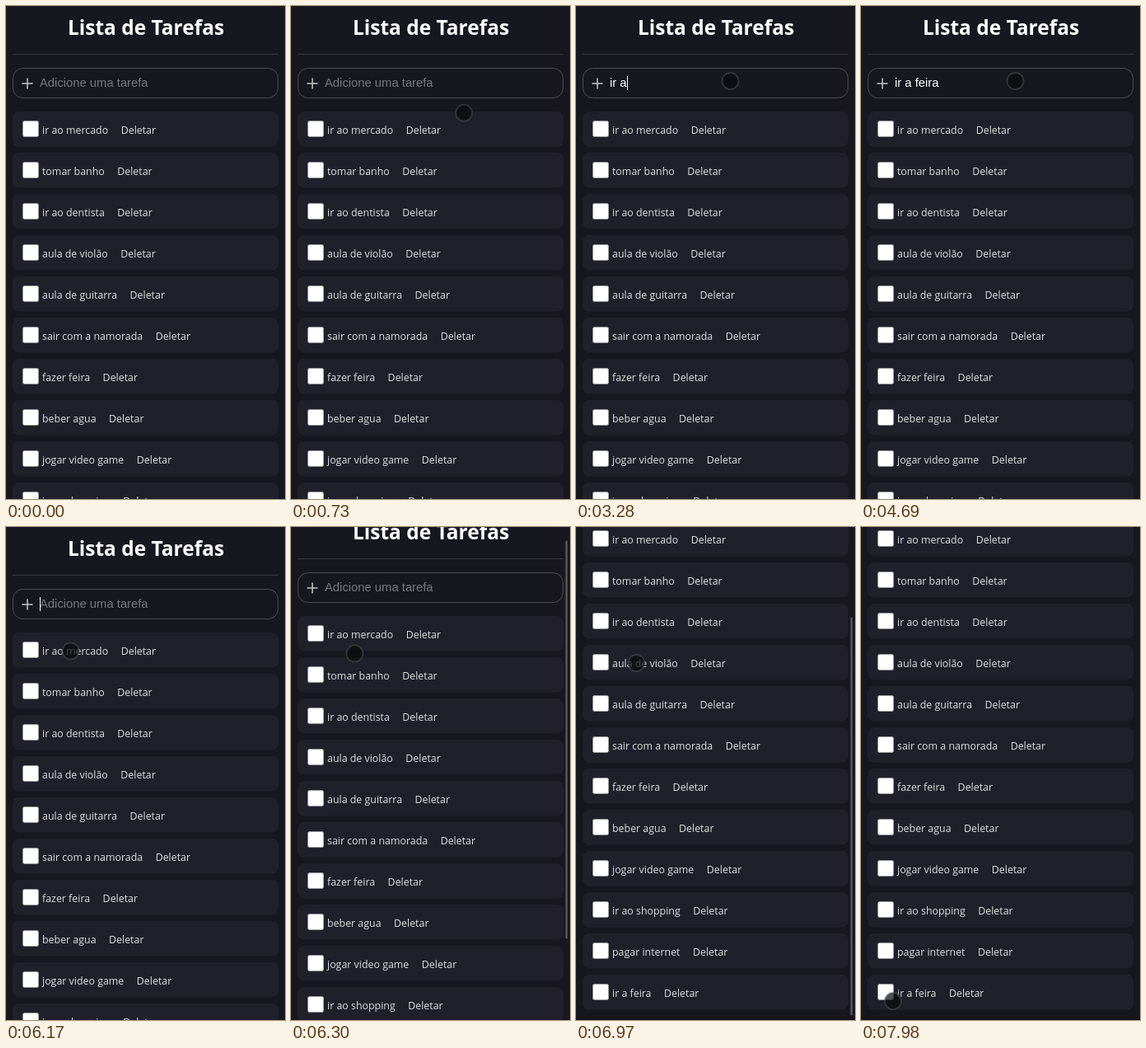
Animation of 339x598 px, one loop 8000 ms. Source, as an HTML page with a canvas:

```html
<!DOCTYPE html>
<html lang="pt">
<head>
<meta charset="utf-8">
<title>Lista de Tarefas</title>
<style>
  html, body { margin: 0; width: 100%; height: 100%; overflow: hidden; background: #17171f; }
  canvas { display: block; width: 339px; height: 598px; }
</style>
</head>
<body>
<canvas id="stage"></canvas>
<script>
const W = 339, H = 598, LOOP = 8000;
const canvas = document.getElementById('stage');
const ctx = canvas.getContext('2d');
const ratio = window.devicePixelRatio || 1;
canvas.width = W * ratio;
canvas.height = H * ratio;

const UI = '"Open Sans", "Noto Sans", sans-serif';
const TITLE_FONT = 'bold 24.5px ' + UI;
const TASK_FONT = '12.4px ' + UI;
const FIELD_FONT = '14.8px "Liberation Sans", Arial, sans-serif';

const tasks = [
  'ir ao mercado', 'tomar banho', 'ir ao dentista', 'aula de violão',
  'aula de guitarra', 'sair com a namorada', 'fazer feira', 'beber agua',
  'jogar video game', 'ir ao shopping', 'pagar internet'
];
const newTask = 'ir a feira';

const ENTER = 187, FOCUS = 1460, TYPE_START = 2730, TYPE_END = 4160, SUBMIT = 4820;
const BLINK = 480;
const ROW = 50, LIST_TOP = 128, ROW_HEIGHT = 42.5;
const PAGE_END = LIST_TOP + (tasks.length + 1) * ROW + 1;
const MAX_SCROLL = PAGE_END + 4 - H;
const WHEEL_STEP = 82;

const pointerStart = { x: 306, y: 545 };
const pointerMoves = [
  { from: ENTER, to: 800, x: 198, y: 77 },
  { from: 1080, to: 1260, x: 187.5, y: 91 },
  { from: 5700, to: 6170, x: 78.5, y: 150.5 },
  { from: 6250, to: 6500, x: 73.5, y: 165 },
  { from: 6980, to: 7450, x: 101, y: 403 },
  { from: 7450, to: 7720, x: 39, y: 575 }
];

const progress = (t, from, to) => Math.max(0, Math.min(1, (t - from) / (to - from)));
const smooth = p => p * p * (3 - 2 * p);
const mix = (a, b, p) => a + (b - a) * p;

function pointerAt(t) {
  return pointerMoves.reduce((pos, move) => {
    const p = progress(t, move.from, move.to);
    return { x: mix(pos.x, move.x, p), y: mix(pos.y, move.y, p) };
  }, pointerStart);
}

// Typing runs a little faster around the middle of the phrase
function keyTime(i) {
  const p = i / (newTask.length - 1);
  return mix(TYPE_START, TYPE_END, p) - 60 * Math.sin(Math.PI * p);
}

const scrollAt = t =>
  WHEEL_STEP * smooth(progress(t, 6240, 6430)) +
  (MAX_SCROLL - WHEEL_STEP) * smooth(progress(t, 6800, 6970));

function text(str, x, y, font, color, align = 'left') {
  ctx.font = font;
  ctx.fillStyle = color;
  ctx.textAlign = align;
  ctx.fillText(str, x, y);
  return ctx.measureText(str).width;
}

function roundBox(x, y, w, h, r, fill, stroke) {
  ctx.beginPath();
  ctx.roundRect(x, y, w, h, r);
  if (fill) { ctx.fillStyle = fill; ctx.fill(); }
  if (stroke) { ctx.strokeStyle = stroke; ctx.lineWidth = 1; ctx.stroke(); }
}

function drawPlus(x, y, arm) {
  ctx.strokeStyle = '#c6c6c8';
  ctx.lineWidth = 1.5;
  ctx.beginPath();
  ctx.moveTo(x - arm, y);
  ctx.lineTo(x + arm, y);
  ctx.moveTo(x, y - arm);
  ctx.lineTo(x, y + arm);
  ctx.stroke();
}

function drawField(t) {
  roundBox(8.5, 75.5, 322, 36, 12, null, '#4c4c53');
  drawPlus(26, 94, 6.5);

  const keys = [...newTask].map((_, i) => keyTime(i)).filter(k => k <= t);
  const value = t < SUBMIT ? newTask.slice(0, keys.length) : '';
  if (value) text(value, 41, 98, FIELD_FONT, '#fff');
  else text('Adicione uma tarefa', 41, 98, FIELD_FONT, '#77777c');

  // The caret restarts its blink at every input
  const lastInput = Math.max(...[FOCUS, ...keys, SUBMIT].filter(k => k <= t));
  if (t >= FOCUS && (t - lastInput) % (2 * BLINK) < BLINK) {
    ctx.font = FIELD_FONT;
    ctx.fillStyle = '#fff';
    ctx.fillRect(41 + Math.round(ctx.measureText(value).width), 85, 1, 17);
  }
}

function drawTask(label, i) {
  const y = LIST_TOP + i * ROW;
  roundBox(8, y, 323, ROW_HEIGHT, 8, '#20202b');
  roundBox(20.5, y + 11.5, 19, 19, 2, '#fff', '#9a9a9c');
  const width = text(label, 44, y + 27, TASK_FONT, '#dedee0');
  text('Deletar', 44 + width + 15.5, y + 27, TASK_FONT, '#dedee0');
}

function drawScrollbar(scroll, alpha) {
  const scale = (H - 6) / (H + MAX_SCROLL);
  ctx.globalAlpha = alpha;
  roundBox(333.5, 0.5 + scroll * scale, 2.5, H * scale, 1.2, '#55555a');
  ctx.globalAlpha = 1;
}

function drawPointer({ x, y }) {
  ctx.beginPath();
  ctx.arc(x, y, 10, 0, Math.PI * 2);
  ctx.fillStyle = 'rgba(10,11,13,0.72)';
  ctx.fill();
  ctx.strokeStyle = 'rgba(78,78,80,0.55)';
  ctx.lineWidth = 1.8;
  ctx.stroke();
}

function draw(t) {
  ctx.setTransform(ratio, 0, 0, ratio, 0, 0);
  ctx.fillStyle = '#17171f';
  ctx.fillRect(0, 0, W, H);

  const scroll = scrollAt(t);
  ctx.save();
  ctx.translate(0, -scroll);
  text('Lista de Tarefas', 170, 35, TITLE_FONT, '#fff', 'center');
  ctx.fillStyle = '#38383b';
  ctx.fillRect(8, 58, 323, 1);
  drawField(t);
  tasks.forEach(drawTask);
  if (t >= SUBMIT) drawTask(newTask, tasks.length);
  ctx.fillStyle = '#131319';
  ctx.fillRect(0, PAGE_END, W, 4);
  ctx.restore();

  if (scroll > 0) drawScrollbar(scroll, 1 - progress(t, 7270, 7450));
  if (t >= ENTER) drawPointer(pointerAt(t));
}

const start = performance.now();
function tick() {
  draw((performance.now() - start) % LOOP);
  requestAnimationFrame(tick);
}
tick();
</script>
</body>
</html>
```
